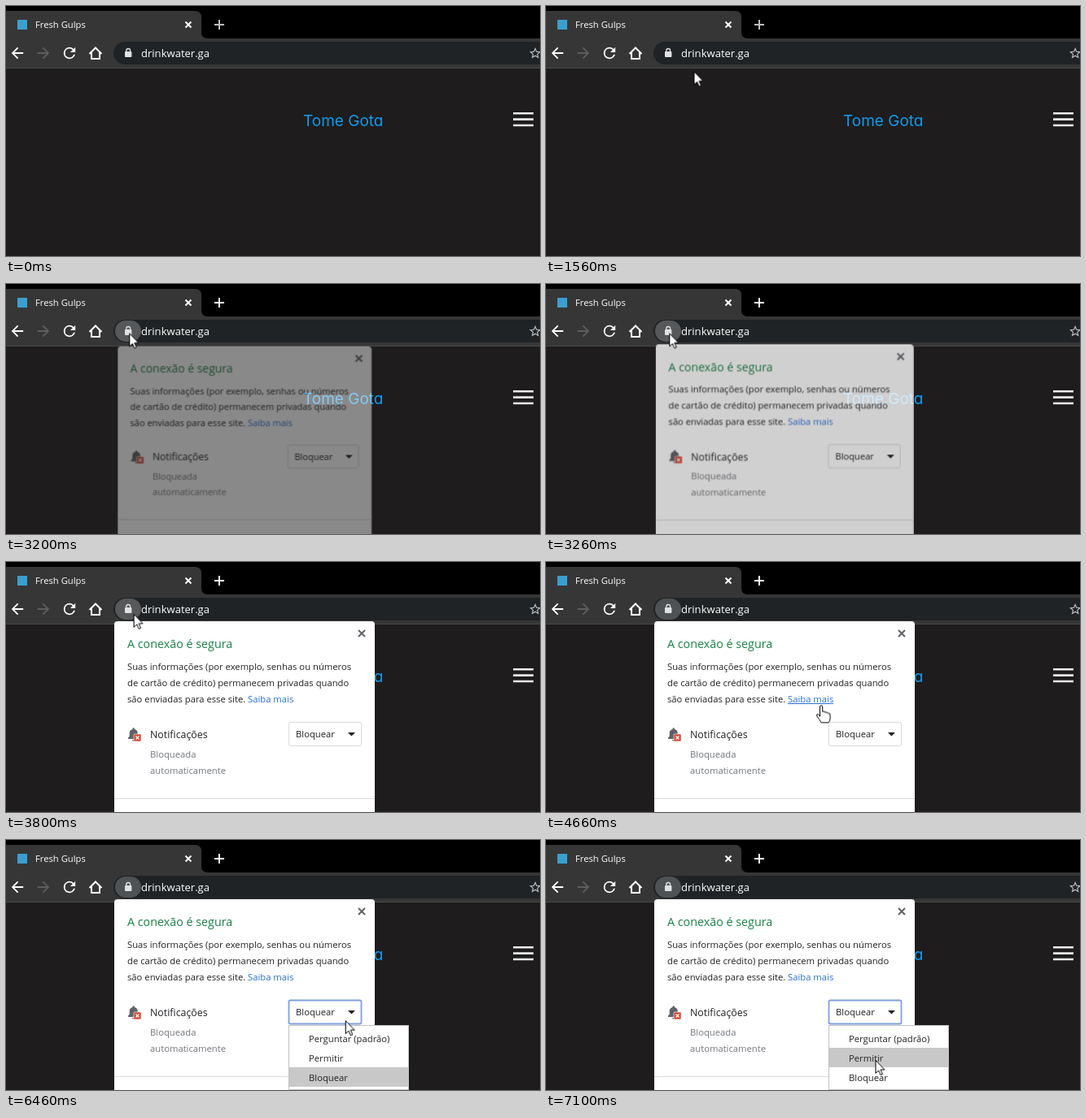
Recreate the animation shown at these times as an HTML page. Size 656 by 308 pixels, loop 8 s.

```html
<!DOCTYPE html>
<html lang="pt">
<head>
<meta charset="utf-8">
<title>Notificações</title>
<style>
html, body { margin: 0; width: 100%; height: 100%; overflow: hidden; background: #1e1c1c; }
svg { display: block; width: 100vw; height: 100vh; }
text { font: 11.25px "Open Sans", "Noto Sans", sans-serif; fill: #202124; white-space: pre; }
.url { font-size: 13.05px; fill: #fff; }
.tab { fill: #fff; }
.brand { font: 19px Inter, sans-serif; font-feature-settings: "cv11"; fill: #129bee; }
.heading { font-size: 14.3px; fill: #188045; }
.label { font-size: 12.4px; }
.muted { fill: #73777c; }
.link { fill: #2670d8; }
.line { fill: none; stroke: #fff; stroke-width: 2; }

/* One loop is 8 s, so 1% is 80 ms. */
.plus, .bar, .chip, .popup, .cursor, .focus { animation: 8s linear infinite; }
.link-hover, .arrow, .menu, .row { animation: 8s step-end infinite; }
.plus { animation-name: plus; }
.bar { animation-name: bar; }
.chip { animation-name: chip; }
.popup { animation-name: popup; transform-origin: 293px 237px; }
.cursor { animation-name: cursor; }
.focus { animation-name: focus; }
.link-hover { animation-name: link-hover; }
.arrow { animation-name: arrow; }
.menu { animation-name: menu; }
.ask { animation-name: ask; }
.allow { animation-name: allow; }
.block { animation-name: block; }

@keyframes plus { 0%, 36.2% { stroke: #bdbdbd; } 37.5%, 100% { stroke: #fff; } }
@keyframes bar {
  0%, 23.7% { fill: #202325; }
  25.6% { fill: #292c2e; }
  30%, 100% { fill: #202325; }
}
@keyframes chip {
  0%, 25.2% { fill: #202325; }
  28%, 36.2% { fill: #47494b; }
  37.5%, 47.5% { fill: #565859; }
  51%, 100% { fill: #4f5254; }
}
@keyframes popup {
  0%, 39.4% { opacity: 0; transform: scale(.95); }
  40% { opacity: .48; transform: scale(.975); }
  41.25%, 100% { opacity: 1; transform: none; }
}
@keyframes cursor {
  0%, 5.6% { transform: translate(381px, 325px); animation-timing-function: cubic-bezier(.2, .5, .5, 1); }
  19.5%, 21% { transform: translate(181.5px, 80.5px); animation-timing-function: cubic-bezier(.4, .1, .5, 1); }
  30.75%, 47% { transform: translate(151.3px, 60.5px); animation-timing-function: cubic-bezier(.35, .2, .75, .75); }
  57.5% { transform: translate(328px, 172px); animation-timing-function: cubic-bezier(.25, .4, .6, 1); }
  67.9% { transform: translate(413px, 209px); }
  70%, 77% { transform: translate(417.5px, 211px); animation-timing-function: ease-in; }
  82.5% { transform: translate(416px, 232px); }
  85.4% { transform: translate(409px, 256px); animation-timing-function: ease-out; }
  88.75%, 100% { transform: translate(404.5px, 271px); }
}
@keyframes focus { 0%, 74.5% { opacity: 0; } 76%, 100% { opacity: 1; } }
@keyframes link-hover { 0% { opacity: 0; } 56.5% { opacity: 1; } 58.9%, 100% { opacity: 0; } }
@keyframes arrow { 0% { opacity: 1; } 56.5% { opacity: 0; } 58.9%, 100% { opacity: 1; } }
@keyframes menu { 0% { opacity: 0; } 75%, 100% { opacity: 1; } }
@keyframes ask { 0% { opacity: 0; } 82.5% { opacity: 1; } 85.4%, 100% { opacity: 0; } }
@keyframes allow { 0% { opacity: 0; } 85.4%, 100% { opacity: 1; } }
@keyframes block { 0% { opacity: 1; } 82.5%, 100% { opacity: 0; } }
</style>
</head>
<body>
<svg viewBox="0 0 656 308" preserveAspectRatio="none">
  <!-- Window frame and tab -->
  <rect width="656" height="40" fill="#000"/>
  <path d="M0 40V6H232Q240 6 240 14V32Q240 40 248 40Z" fill="#363636"/>
  <rect y="40" width="656" height="36" fill="#363636"/>
  <rect y="76" width="656" height="1" fill="#484848"/>
  <rect x="14" y="17" width="12" height="12" fill="#3a9fd0"/>
  <text class="tab" x="36" y="27">Fresh Gulps</text>
  <path class="line" stroke-width="1.7" d="M220.5 19.5l7 7m0-7l-7 7"/>
  <path class="line plus" d="M256 23h12m-6-6v12"/>

  <!-- Toolbar -->
  <g fill="#fff">
    <path id="back" transform="translate(3.2 47.2) scale(.9)" d="M20 11H7.83l5.59-5.59L12 4l-8 8 8 8 1.41-1.41L7.83 13H20z"/>
    <use href="#back" transform="translate(60 0) scale(-1 1)" fill="#868686" opacity=".5"/>
    <path transform="translate(67.2 47.2) scale(.9)" d="M17.65 6.35A7.96 7.96 0 0 0 12 4a8 8 0 1 0 7.73 10h-2.08A6 6 0 1 1 12 6c1.66 0 3.14.69 4.22 1.78L13 11h7V4z"/>
  </g>
  <path class="line" d="M102.5 59L110 51.5 117.5 59M105 57v8h10v-8"/>
  <rect class="bar" x="132" y="44" width="550" height="28" rx="14"/>
  <rect class="chip" x="134" y="45" width="32" height="26" rx="13"/>
  <rect x="146" y="56" width="8.4" height="7" rx="1" fill="#dfe1e3"/>
  <path d="M147.8 56.5v-1.6a2.4 2.4 0 0 1 4.8 0v1.6" fill="none" stroke="#dfe1e3" stroke-width="1.3"/>
  <text class="url" x="166" y="63">drinkwater.ga</text>
  <path fill="#bfc1c3" transform="translate(641.5 49.5) scale(.72)" d="M22 9.24l-7.19-.62L12 2 9.19 8.63 2 9.24l5.46 4.73L5.82 21 12 17.27 18.18 21l-1.63-7.03zM12 15.4l-3.76 2.27 1-4.28-3.32-2.88 4.38-.38L12 6.1l1.71 4.04 4.38.38-3.32 2.88 1 4.28z"/>

  <!-- Page -->
  <text class="brand" x="365" y="148">Tome Gota</text>
  <path d="M623 132.3h25m-25 7.3h25m-25 7.4h25" stroke="#ececec" stroke-width="2.6"/>

  <!-- Site information -->
  <g class="popup">
    <rect x="133" y="73" width="320" height="328" rx="4" fill="#fff"/>
    <path d="M433 84l8 8m0-8l-8 8" stroke="#5f6368" stroke-width="2"/>
    <text class="heading" x="149" y="106">A conexão é segura</text>
    <text x="149" y="133">Suas informações (por exemplo, senhas ou números</text>
    <text x="149" y="153">de cartão de crédito) permanecem privadas quando</text>
    <text x="149" y="173">são enviadas para esse site.</text>
    <text class="link" x="297" y="173">Saiba mais</text>
    <path class="link-hover" d="M297 174.5h56" stroke="#2670d8"/>
    <path d="M150 218v-1.5l1.7-1.7v-4q0-3.9 3.8-4.8v-.6a1.2 1.2 0 0 1 2.4 0v.6q3.8.9 3.8 4.8v4l1.7 1.7v1.5zM155 219h3.4a1.7 1.7 0 0 1-3.4 0z" fill="#5f6368"/>
    <rect x="157" y="212" width="9" height="9" rx="1" fill="#d34836" stroke="#fff" stroke-width=".6"/>
    <path d="M159.5 214.5l4 4m0-4l-4 4" stroke="#fff" stroke-width="1.2"/>
    <text class="label" x="177" y="217">Notificações</text>
    <text class="muted" x="177" y="241">Bloqueada</text>
    <text class="muted" x="177" y="261">automaticamente</text>
    <rect x="347.5" y="197.5" width="89" height="29" rx="2" fill="#fff" stroke="#d8dadd"/>
    <rect class="focus" x="347.5" y="197.5" width="89" height="29" rx="2" fill="none" stroke="#7f9fdc" stroke-width="1.8"/>
    <text x="356" y="216">Bloquear</text>
    <path d="M420 210h9l-4.5 4.5z" fill="#202124"/>
    <path d="M133 291.5h320" stroke="#d8dadd"/>
  </g>

  <!-- Permission menu -->
  <g class="menu">
    <rect x="349" y="230" width="148" height="80" rx="2" fill="#000" opacity=".15"/>
    <rect x="347.5" y="228.5" width="147" height="79" fill="#fff" stroke="#c0c0c0"/>
    <g fill="#c8c8c8">
      <rect class="row ask" x="348" y="232" width="146" height="24"/>
      <rect class="row allow" x="348" y="256" width="146" height="24"/>
      <rect class="row block" x="348" y="280" width="146" height="24"/>
    </g>
    <text x="372" y="249">Perguntar (padrão)</text>
    <text x="372" y="273">Permitir</text>
    <text x="372" y="297">Bloquear</text>
  </g>

  <g class="cursor" fill="#fff" stroke="#000" stroke-linejoin="round">
    <path class="arrow" d="M.5.5V16.4L4.1 13 6.6 18.6 9 17.5 6.6 12H11.5Z"/>
    <path class="link-hover" d="M-1.5 14V2a1.6 1.6 0 0 1 3.2 0V8q3-1 3.2 1 3-1 3.2 1 3-.7 3 2v4q0 3-2 5.5H0q-2-4-5-7.5-1.5-3 1-3 1.5 1 2.5 3Z"/>
  </g>
</svg>
</body>
</html>
```
